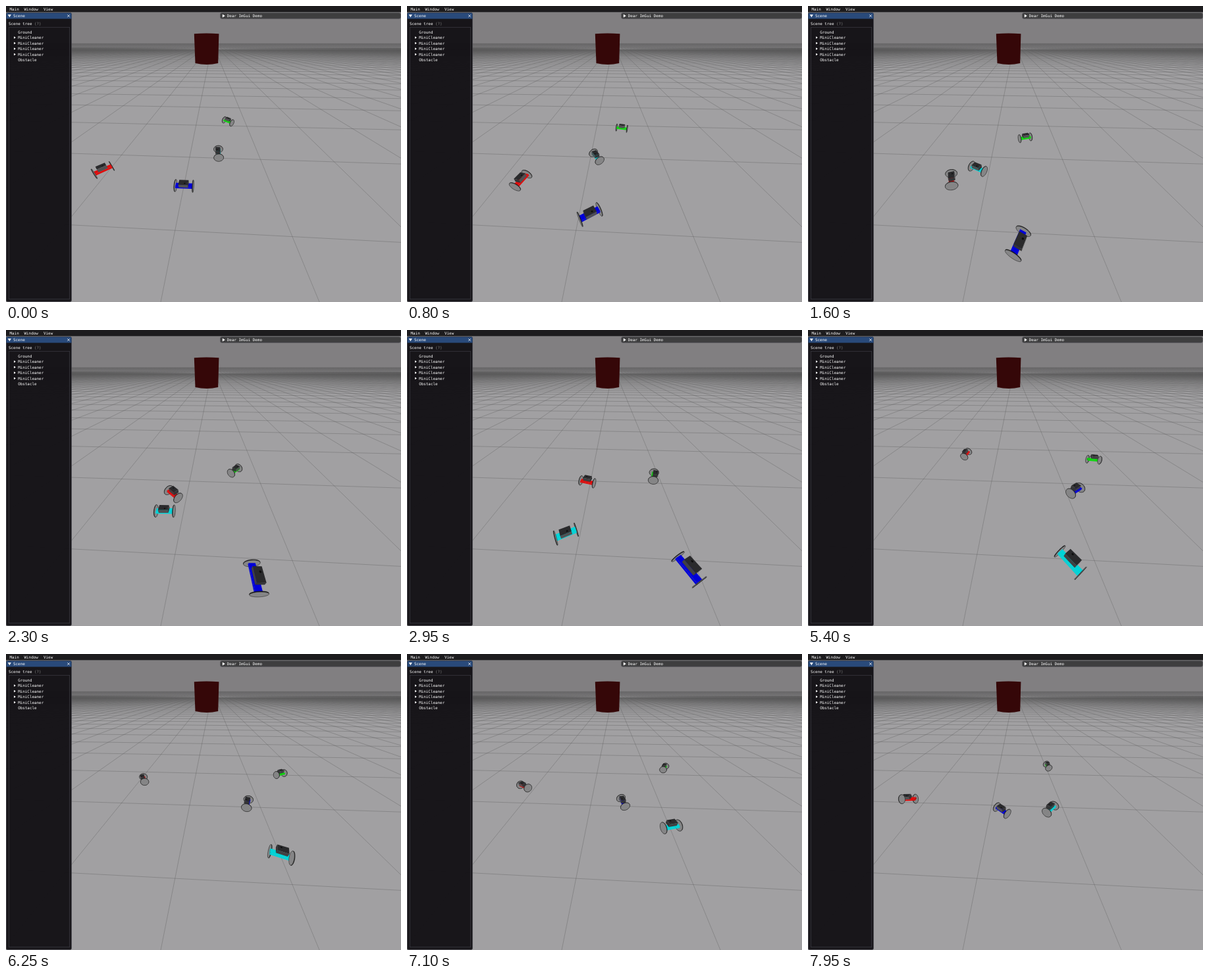
An HTML page with a canvas for the animation above (8 s loop, 600 by 450 pixels).

```html
<!DOCTYPE html>
<html lang="en">
<head>
<meta charset="utf-8">
<title>Robot scene</title>
<style>
  html, body { margin: 0; width: 100%; height: 100%; overflow: hidden; background: #a1a0a2; }
  canvas, svg { position: absolute; left: 0; top: 0; width: 600px; height: 450px; }
  text { font: 5.9px "DejaVu Sans Mono", "Liberation Mono", monospace; fill: #fff; white-space: pre; }
</style>
</head>
<body>
<canvas id="stage" width="600" height="450"></canvas>
<svg viewBox="0 0 600 450">
  <rect width="600" height="9.3" fill="#1d1c1e"/>
  <text x="5.5" y="7.2">Main</text>
  <text x="27.5" y="7.2">Window</text>
  <text x="57" y="7.2">View</text>

  <rect x="325.5" y="10.5" width="274" height="8.8" rx="2.5" fill="#3e3e3f" stroke="#505054" stroke-width=".6"/>
  <path d="M328.8 12.6l4 2.4-4 2.4z" fill="#fff"/>
  <text x="335.8" y="17.2">Dear ImGui Demo</text>

  <rect x=".3" y="10.3" width="99.2" height="439.2" rx="2" fill="#131115" fill-opacity=".96" stroke="#45454c" stroke-width=".6"/>
  <path d="M.5 19.5V12.5q0-2 2-2H97.5q2 0 2 2V19.5z" fill="#294a7a"/>
  <path d="M2.8 13h5l-2.5 4.2z" fill="#fff"/>
  <text x="11" y="17.2">Scene</text>
  <path d="M93.2 13.2l3.6 3.6m0-3.6l-3.6 3.6" stroke="#fff" stroke-width=".7"/>
  <text x="4" y="29.2">Scene tree <tspan fill="#808080">(?)</tspan></text>
  <rect x="4.3" y="32.3" width="92.4" height="413.4" fill="none" stroke="#3c3c44" stroke-width=".7"/>
  <g id="tree"></g>
</svg>
<script>
const CENTER_X = 300, CENTER_Y = 225, FOCAL = 212, HEIGHT = 1.28;
const PITCH = Math.atan(168.5 / FOCAL), YAW = 0.05;
const SIN = Math.sin(PITCH), COS = Math.cos(PITCH);
const LOOP = 8000, STEP = 50, TURN_RATE = 40.15, ORBIT = 0.595;
const WHEEL = 0.065, WHEEL_AT = 0.096, TYRE = 0.002;

// Circle centre on the ground (right, ahead) and starting angle in degrees
const robots = [
  { color: ['#e00c0c', '#b80a0a'], x: -0.797, d: 1.628, start: 223.7 },
  { color: ['#0000d8', '#0000b4'], x: 0.385, d: 0.943, start: 177.2 },
  { color: ['#00d4d8', '#00b0b4'], x: 0.18, d: 0.95, start: 87 },
  { color: ['#08d808', '#06b406'], x: 0.89, d: 2.13, start: 132.7 }
];
const bodyColors = { top: '#2a2a2c', front: '#505052', back: '#404042', side: '#343436' };

const names = ['Ground', 'MiniCleaner', 'MiniCleaner', 'MiniCleaner', 'MiniCleaner', 'Obstacle'];
document.getElementById('tree').innerHTML = names.map((name, i) => {
  const y = 39.5 + i * 8.5;
  const arrow = name === 'MiniCleaner' ? `<path d="M12 ${y - 1.7}l2.9 1.7-2.9 1.7z" fill="#fff"/>` : '';
  return `${arrow}<text x="18.2" y="${y + 2.1}">${name}</text>`;
}).join('');

const stage = document.getElementById('stage').getContext('2d');

const depth = ([, d, z]) => d * COS + (HEIGHT - z) * SIN;

function project(p) {
  const w = depth(p);
  return [CENTER_X + FOCAL * p[0] / w, CENTER_Y + FOCAL * ((HEIGHT - p[2]) * COS - p[1] * SIN) / w];
}

function polygon(g, points, fill, line) {
  g.beginPath();
  points.forEach(p => g.lineTo(p[0], p[1]));
  g.closePath();
  g.fillStyle = fill;
  g.fill();
  if (line) { g.strokeStyle = line; g.stroke(); }
}

function verticalGradient(g, y0, y1, stops) {
  const gradient = g.createLinearGradient(0, y0, 0, y1);
  stops.forEach(([at, color]) => gradient.addColorStop(at, color));
  return gradient;
}

function gridPoint(u, v) {
  return project([u * Math.cos(YAW) + v * Math.sin(YAW), v * Math.cos(YAW) - u * Math.sin(YAW), 0]);
}

function drawScenery(g) {
  g.fillStyle = '#817f81';
  g.fillRect(0, 0, 600, 57);
  g.fillStyle = '#a1a0a2';
  g.fillRect(0, 56.5, 600, 394);

  g.beginPath();
  for (let i = 0; i < 45; i++) {
    const v = 0.525 + i;
    g.moveTo(...gridPoint(-80, v));
    g.lineTo(...gridPoint(Math.min(80, (v + 0.6) / YAW), v));
  }
  for (let i = -60; i <= 60; i++) {
    const u = i - 0.275;
    g.moveTo(...gridPoint(u, u * YAW - 0.6));
    g.lineTo(...gridPoint(u, 60));
  }
  g.lineWidth = 0.7;
  g.strokeStyle = 'rgba(84,84,86,.48)';
  g.stroke();

  g.fillStyle = verticalGradient(g, 56.5, 104, [
    [0, 'rgba(96,95,96,.9)'], [0.14, 'rgba(96,95,96,.7)'],
    [0.21, 'rgba(96,95,96,.32)'], [0.45, 'rgba(96,95,96,.09)'], [1, 'rgba(96,95,96,0)']
  ]);
  g.fillRect(0, 56.5, 600, 48);

  g.fillStyle = '#350708';
  g.fill(new Path2D('M285.8 42.2Q304.5 40.8 323.4 42.2L322.2 87Q305 91 287.5 87Z'));
}

// Local axes: a along the axle (outwards), f forwards, z up
function makeFrame(robot, time) {
  const angle = (robot.start + TURN_RATE * time / 1000) * Math.PI / 180;
  const c = Math.cos(angle), s = Math.sin(angle);
  return ([a, f, z]) => [
    robot.x + (ORBIT + a) * c - f * s,
    robot.d + (ORBIT + a) * s + f * c,
    z
  ];
}

function drawBox(place, a, [f0, f1], [z0, z1], colors) {
  const faces = [
    [[-a, f0, z1], [a, f0, z1], [a, f1, z1], [-a, f1, z1], colors.top],
    [[-a, f1, z0], [-a, f1, z1], [a, f1, z1], [a, f1, z0], colors.front],
    [[-a, f0, z1], [-a, f0, z0], [a, f0, z0], [a, f0, z1], colors.back],
    [[a, f0, z0], [a, f1, z0], [a, f1, z1], [a, f0, z1], colors.side],
    [[-a, f1, z0], [-a, f0, z0], [-a, f0, z1], [-a, f1, z1], colors.side]
  ];
  for (const face of faces) {
    const points = face.slice(0, 4).map(p => project(place(p)));
    const area = points.reduce((sum, p, i) => {
      const q = points[(i + 1) % 4];
      return sum + p[0] * q[1] - q[0] * p[1];
    }, 0);
    if (area < 0) polygon(stage, points, face[4]);
  }
}

function disc(place, center, radius, flat) {
  return Array.from({ length: 28 }, (_, i) => {
    const t = i * Math.PI / 14, p = radius * Math.cos(t), q = radius * Math.sin(t);
    const [a, f, z] = center;
    return project(place(flat ? [a + p, f + q, z] : [a, f + p, z + q]));
  });
}

function drawWheel(place, a) {
  const hub = place([a, 0, WHEEL]), out = place([a + 1, 0, WHEEL]);
  const facing = -hub[0] * (out[0] - hub[0]) - hub[1] * (out[1] - hub[1]);
  const near = facing > 0 ? TYRE : -TYRE;
  stage.lineWidth = 0.6;
  polygon(stage, disc(place, [a - near, 0, WHEEL], WHEEL), '#141414', '#141414');
  polygon(stage, disc(place, [a + near, 0, WHEEL], WHEEL), '#858586', '#303030');
}

function drawRobot(robot, time) {
  const place = makeFrame(robot, time);
  const [bright, dark] = robot.color;
  const ends = [-WHEEL_AT, WHEEL_AT].sort((p, q) => depth(place([q, 0, WHEEL])) - depth(place([p, 0, WHEEL])));
  drawWheel(place, ends[0]);
  drawBox(place, 0.094, [-0.028, 0.026], [0.052, 0.076], { top: bright, front: bright, back: bright, side: dark });
  drawBox(place, 0.05, [-0.02, 0.046], [0.093, 0.138], bodyColors);
  polygon(stage, disc(place, [-0.015, 0.025, 0.138], 0.008, true), '#0c0c0c');
  drawWheel(place, ends[1]);
}

const scenery = document.createElement('canvas');
scenery.width = 600;
scenery.height = 450;
drawScenery(scenery.getContext('2d'));

const began = performance.now();

function render() {
  const time = Math.floor((performance.now() - began) % LOOP / STEP) * STEP;
  stage.drawImage(scenery, 0, 0);
  const distance = robot => makeFrame(robot, time)([0, 0, 0])[1];
  [...robots].sort((p, q) => distance(q) - distance(p)).forEach(robot => drawRobot(robot, time));
  requestAnimationFrame(render);
}
render();
</script>
</body>
</html>
```
